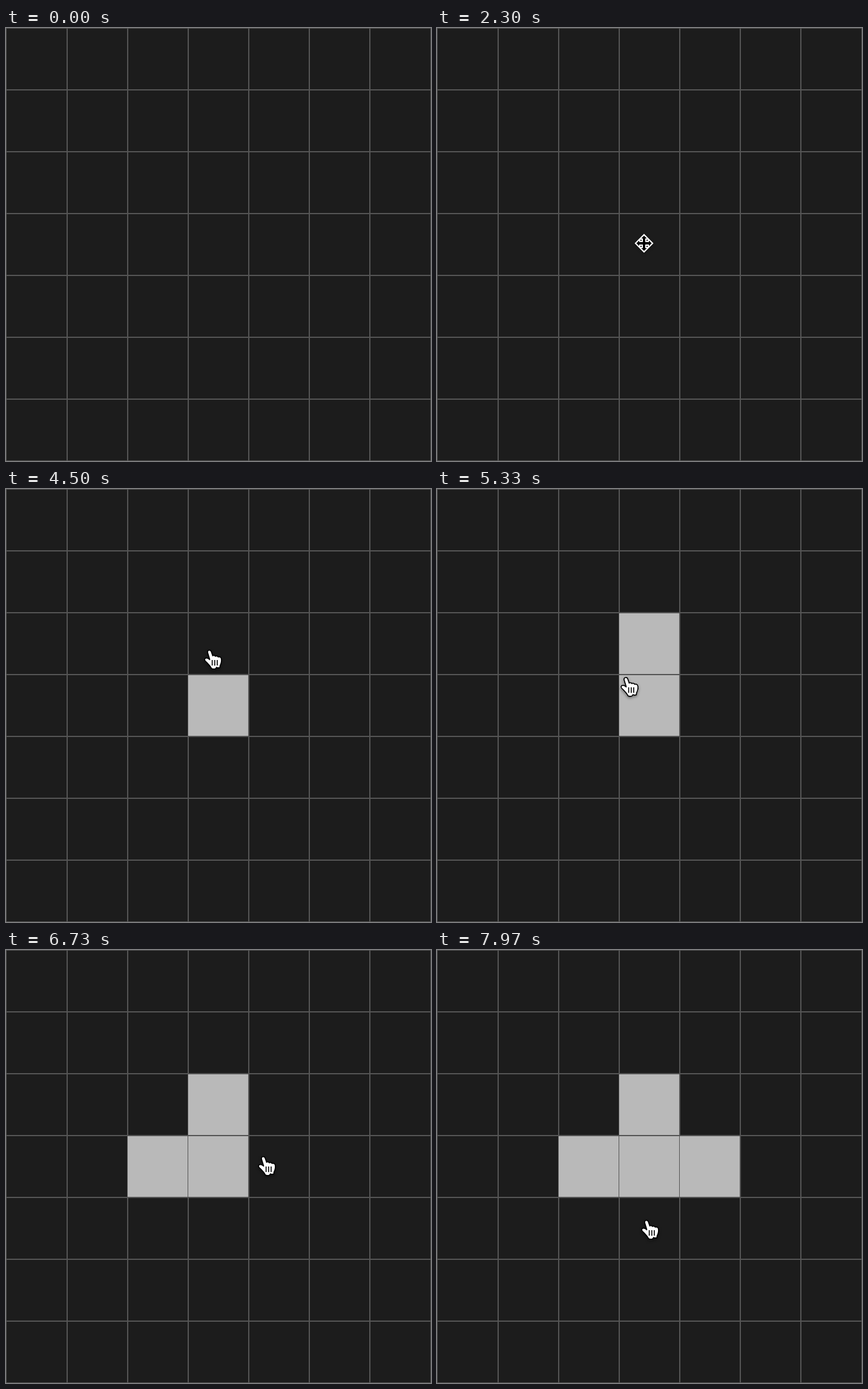
An HTML page with a canvas for the animation above (8 s loop, 702 by 714 pixels).

```html
<!DOCTYPE html>
<html lang="en">
<head>
<meta charset="utf-8">
<title>Grid clicks</title>
<style>
  html, body { margin: 0; width: 100%; height: 100%; overflow: hidden; background: #1c1c1c; }
  canvas { display: block; }
</style>
</head>
<body>
<canvas id="stage" width="702" height="714"></canvas>
<script>
const ctx = document.getElementById('stage').getContext('2d');
const LOOP = 8000, STEP = 100 / 3;

// Click time, column and row of each lit cell
const clicks = [[3600, 3, 3], [4770, 3, 2], [5900, 2, 3], [7070, 4, 3]];

// Pointer moves: start and end time, ease-out power, quadratic curve (start, control, end)
const moves = [
  { from: 1337, to: 2170, pow: 1.56, path: [715, 679, 516.6, 516, 351, 359] },
  { from: 2170, to: 2330, pow: 1.4, path: [351, 359, 346, 357, 341, 355] },
  { from: 2870, to: 2871, pow: 1, path: [331, 354, 331, 354, 331, 354] },
  { from: 4037, to: 4630, pow: 1.6, path: [331, 354, 329, 305, 327, 257] },
  { from: 5037, to: 5770, pow: 1.5, path: [327, 257, 326, 317, 248, 335] },
  { from: 6237, to: 6900, pow: 1.7, path: [248, 335, 340, 315, 433, 345] },
  { from: 7337, to: 7970, pow: 1.5, path: [433, 345, 385, 395, 337, 445] }
];
const HAND_FROM = 2870;

const diamond = new Path2D('M0-14L14 0L0 14L-14 0Z');
const hand = new Path2D(
  'M7 5C5.8 1.2 10.2 .2 11.4 3.8L14 11.2C15 9.6 18 9.9 18.6 11.9' +
  'C19.7 10.6 22.6 11.1 23.1 13.1C24.4 12 27.4 12.6 27.9 15' +
  'C28.5 18.2 27.9 21.6 26.5 24.4C25.6 26.2 25.5 27 25.6 28.8L22.4 29' +
  'L20.6 28L18.8 30.4C17.2 31.2 14.8 31.2 13.2 30.6C12 27.8 9 24.4 6 21.2' +
  'C4.2 19.2 1.2 17.4 2.2 15.4C3.6 13.6 6.6 14.8 9.6 17.4L10.4 16Z');
const creases = new Path2D('M13.6 17V26M17.8 17V26.2M21.9 17V26');

function drawGrid(t) {
  ctx.fillStyle = '#1c1c1c';
  ctx.fillRect(0, 0, 702, 714);
  ctx.fillStyle = '#555';
  for (let i = 0; i <= 7; i++) {
    ctx.fillRect(i ? i * 100 + (i === 7 ? 1 : 0) : -1, 0, 2, 714);
    ctx.fillRect(0, i * 102 - 1, 702, 2);
  }
  ctx.fillStyle = '#b9b9b9';
  for (const [time, col, row] of clicks) {
    if (t >= time) ctx.fillRect(col * 100 + 1, row * 102 + 1, 99, 100);
  }
}

function setShadow(on) {
  ctx.shadowColor = on ? 'rgba(0,0,0,.5)' : 'transparent';
  ctx.shadowBlur = on ? 4 : 0;
  ctx.shadowOffsetY = on ? 2 : 0;
}

function outline(path, stroke, fill, width) {
  ctx.lineWidth = width;
  ctx.strokeStyle = stroke;
  ctx.fillStyle = fill;
  setShadow(true);
  ctx.stroke(path);
  setShadow(false);
  ctx.fill(path);
  ctx.stroke(path);
}

function drawMoveCursor() {
  outline(diamond, '#fff', '#000', 2);
  for (const x of [-5, 5]) for (const y of [-5, 5]) {
    ctx.fillStyle = '#fff';
    ctx.fillRect(x - 3, y - 3, 6, 6);
    ctx.fillStyle = '#1c1c1c';
    ctx.fillRect(x - 1, y - 1, 2, 2);
  }
}

function drawHand() {
  ctx.lineJoin = 'round';
  outline(hand, '#000', '#fff', 3);
  ctx.fill(hand);
  ctx.lineWidth = 1.6;
  ctx.stroke(creases);
}

function drawPointer(t) {
  const move = moves.filter(m => t >= m.from).pop();
  if (!move) return;
  const p = Math.min(1, (t - move.from) / (move.to - move.from));
  const u = 1 - (1 - p) ** move.pow, v = 1 - u;
  const [x0, y0, cx, cy, x1, y1] = move.path;
  const along = (a, b, c) => Math.round(v * v * a + 2 * u * v * b + u * u * c);
  ctx.save();
  ctx.translate(along(x0, cx, x1), along(y0, cy, y1));
  if (t < HAND_FROM) drawMoveCursor(); else drawHand();
  ctx.restore();
}

function render(now) {
  // The scene advances at 30 steps per second
  const t = Math.floor((now % LOOP + 4) / STEP) * STEP + 4;
  drawGrid(t);
  drawPointer(t);
  requestAnimationFrame(render);
}

const start = performance.now();
requestAnimationFrame(function first() {
  const loop = () => {
    const t = Math.floor(((performance.now() - start) % LOOP + 4) / STEP) * STEP + 4;
    drawGrid(t);
    drawPointer(t);
    requestAnimationFrame(loop);
  };
  loop();
});
</script>
</body>
</html>
```
